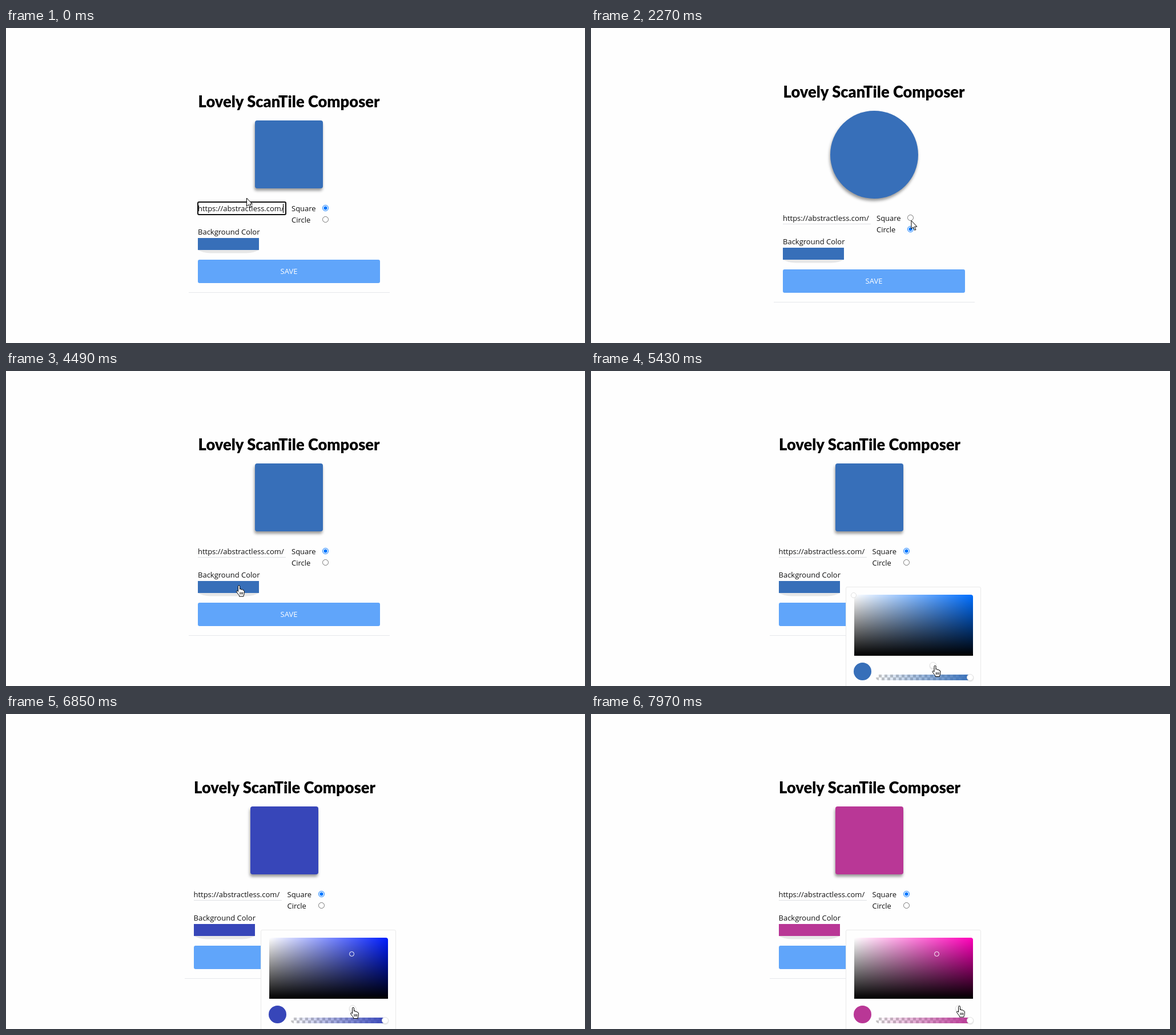
Write an HTML page that moves like this. It is 1014x552 px and loops after 8000 ms.

```html
<!DOCTYPE html>
<html lang="en">
<head>
<meta charset="utf-8">
<title>Tile generator</title>
<style>
  html, body { margin: 0; width: 100%; height: 100%; overflow: hidden; background: #fefefe; }
  body { position: relative; font: 13px/20px "Open Sans", "Noto Sans", sans-serif; color: #111; }
  div, svg { position: absolute; box-sizing: border-box; white-space: nowrap; }
  .stage {
    --hue: 214; --x: 0px; --shift: 0px;
    --color: hsl(var(--hue) 54% 47.1%);
    left: 0; top: 0; width: 1014px; height: 552px; overflow: hidden;
  }
  .round { --shift: 17px; }
  .open { --x: -7.5px; }
  .page { left: var(--x); top: 0; }
  .title {
    left: 236px; top: calc(114px - var(--shift)); width: 519px; text-align: center;
    font: 900 27.3px/30px Lato, "Open Sans", sans-serif; color: #000;
  }
  .card {
    left: 435.5px; top: 162.4px; width: 119px; height: 119px; border-radius: 4px;
    background: var(--color); box-shadow: -1px 4px 5px rgba(0, 0, 0, .4);
  }
  .round .card { left: 418.5px; top: 145px; width: 154px; height: 154px; border-radius: 50%; }
  .form { left: 0; top: var(--shift); }
  .url { left: 336px; top: 306px; }
  .line { left: 336px; top: 326px; width: 154px; height: 1px; background: #dfe1e4; }
  .ring { left: 335px; top: 304px; width: 156px; height: 24px; border: 2px solid #101010; border-radius: 3px; }
  .caret { left: 485px; top: 308px; width: 1px; height: 16px; background: #000; }
  .ring, .caret { visibility: hidden; }
  .focus .ring, .focus.blink .caret { visibility: visible; }
  .focus .line { visibility: hidden; }
  .radio { left: 554px; width: 11px; height: 11px; border: 1px solid #767676; border-radius: 50%; background: #fff; }
  .stage:not(.round) .square, .round .circle {
    border-color: #0075ff; background: radial-gradient(circle, #0075ff 2.8px, #fff 3.4px);
  }
  .square { top: 310px; }
  .circle { top: 330px; }
  .swatch { left: 336px; top: 368px; width: 107px; height: 21px; background: var(--color); }
  .swatch-shade { left: 336px; top: 389px; }
  .save {
    left: 336px; top: 406px; width: 319px; height: 40.5px; border-radius: 3px;
    background: #60a5fa; color: #fff; text-align: center; line-height: 41px;
  }
  .rule { left: 320px; top: 463px; width: 352px; height: 1px; background: #e5e7eb; }
  .picker {
    left: 446px; top: 378px; width: 237px; height: 200px; visibility: hidden;
    background: #fefefe; border: 1px solid #e9e9e9; border-radius: 3px;
  }
  .open .picker { visibility: visible; }
  .shades {
    left: 13.5px; top: 13px; width: 208px; height: 107px; border-radius: 4px 4px 0 0;
    background: linear-gradient(to top, #000, transparent),
                linear-gradient(to right, #fff, hsl(var(--hue) 100% 50%));
  }
  .marker { left: 8px; top: 9px; width: 10px; height: 10px; border-radius: 50%; background: #fff; border: 1px solid #e0e0e0; }
  .drag .marker { left: 154px; top: 37px; width: 9px; height: 9px; background: none; border-color: #fff; }
  .dot { left: 13px; top: 132px; width: 31px; height: 31px; border-radius: 50%; background: var(--color); }
  .alpha {
    left: 52px; top: 153px; width: 167px; height: 10px; border-radius: 5px;
    background: linear-gradient(to right, transparent, var(--color)),
                repeating-conic-gradient(#c6c6c6 0 25%, #fff 0 50%) 0 0 / 10px 10px;
  }
  .knob { width: 12px; height: 12px; border-radius: 50%; background: #fff; border: 1px solid #e2e2e2; box-shadow: 0 1px 2px rgba(0, 0, 0, .15); }
  .alpha-knob { left: 211px; top: 152px; }
  .hue-knob { top: 131px; }
  .cursor { left: 0; top: 0; }
  .cursor path { fill: #fff; stroke: #000; stroke-linejoin: round; }
</style>
</head>
<body>
<div class="stage" id="stage">
  <div class="page">
    <div class="title">Lovely ScanTile Composer</div>
    <div class="card"></div>
    <div class="form">
      <div class="url">https://abstractless.com/</div>
      <div class="line"></div><div class="ring"></div><div class="caret"></div>
      <div style="left:500px;top:306px">Square</div>
      <div style="left:500px;top:326px">Circle</div>
      <div class="radio square"></div><div class="radio circle"></div>
      <div style="left:336px;top:347px">Background Color</div>
      <svg class="swatch-shade" width="107" height="6"><path d="M0 0Q9 5 22 5.5H85Q98 5 107 0Z" fill="#e7e7e7"/></svg>
      <div class="swatch"></div>
      <div class="save">SAVE</div>
      <div class="rule"></div>
    </div>
  </div>
  <div class="picker">
    <div class="shades"></div><div class="marker"></div><div class="dot"></div>
    <div class="alpha"></div>
    <div class="knob alpha-knob"></div><div class="knob hue-knob" id="knob"></div>
  </div>
  <svg class="cursor" width="1014" height="552"><path id="cursor"/></svg>
</div>
<script>
  const LOOP = 8000;
  const TICK = 132;   // the screen refreshes in steps of this many ms
  const LEAD = 12;
  const BLINK = 1060;

  const SHAPES = {
    arrow: 'M.5 0V14.5L3.9 11.4 6.3 16.8 8.5 15.9 6.2 10.6H10.5Z',
    beam: 'M-3-8H-1Q0-8 0-7V7Q0 8-1 8H-3M3-8H1Q0-8 0-7V7Q0 8 1 8H3',
    hand: 'M-1.5 11V1.8A1.5 1.5 0 0 1 1.5 1.8V7Q1.5 6 3 6.3 4.3 6.6 4.3 8 5 6.8 6.3 7.3 7.2 7.8 7.2 9 ' +
      '8.6 8.2 9.3 9.8V14Q9.3 16 8 18V19.5H.5V18Q-1.5 15.5-4 12-5.2 10-3.8 9.6-2.5 9.5-1.5 11ZM2 12V16M4.3 12V16M6.6 12V16'
  };

  // Turning points of the pointer: tick, x, y.
  const PATH = [
    [2, 421, 298], [3, 463, 306.5], [5, 468, 306.5], [8, 554, 342], [11, 468, 394], [12, 475, 416],
    [16, 560.5, 337.5], [28, 560, 337.5], [34, 408, 375.5], [37, 459, 342], [40, 597, 504],
    [41, 602.5, 516], [43, 596, 520], [51, 608, 514], [57, 629.5, 513.5], [60, 645, 511.5]
  ];

  const stage = document.getElementById('stage');
  const cursor = document.getElementById('cursor');
  const knob = document.getElementById('knob');

  const mix = (a, b, p) => a + (b - a) * p;

  function pointerAt(tick) {
    const next = PATH.findIndex(point => point[0] > tick);
    if (next < 1) return PATH.at(next).slice(1);
    const [t0, x0, y0] = PATH[next - 1];
    const [t1, x1, y1] = PATH[next];
    const p = (tick - t0) / (t1 - t0);
    return [mix(x0, x1, p), mix(y0, y1, p)];
  }

  // The pointer takes its shape from what lies under it.
  function shapeAt(x, y, open) {
    const over = (left, top, right, bottom) => x > left && x < right && y > top && y < bottom;
    if (open) return over(447, 500, 682, 552) ? 'hand' : 'arrow';
    if (over(336, 304, 490, 328)) return 'beam';
    return over(336, 368, 443, 389) || over(336, 406, 655, 446) ? 'hand' : 'arrow';
  }

  function draw(t) {
    const tick = Math.floor((t + LEAD) / TICK);
    const [x, y] = pointerAt(tick);
    const open = tick >= 36;
    const drag = tick >= 51;
    const flags = {
      open, drag,
      round: t >= 2270 && t < 3730,
      focus: t < 2270,
      blink: t % BLINK < BLINK / 2
    };
    for (const name in flags) stage.classList.toggle(name, flags[name]);
    stage.style.setProperty('--hue', drag ? 241 + (x - 611.5) * 2.25 : 214);
    knob.style.left = (drag ? x - 454 : 146) + 'px';
    cursor.setAttribute('d', SHAPES[shapeAt(x, y, open)]);
    cursor.setAttribute('transform', `translate(${x} ${y})`);
  }

  const start = performance.now();
  function run() {
    draw((performance.now() - start) % LOOP);
    requestAnimationFrame(run);
  }
  run();
</script>
</body>
</html>
```
